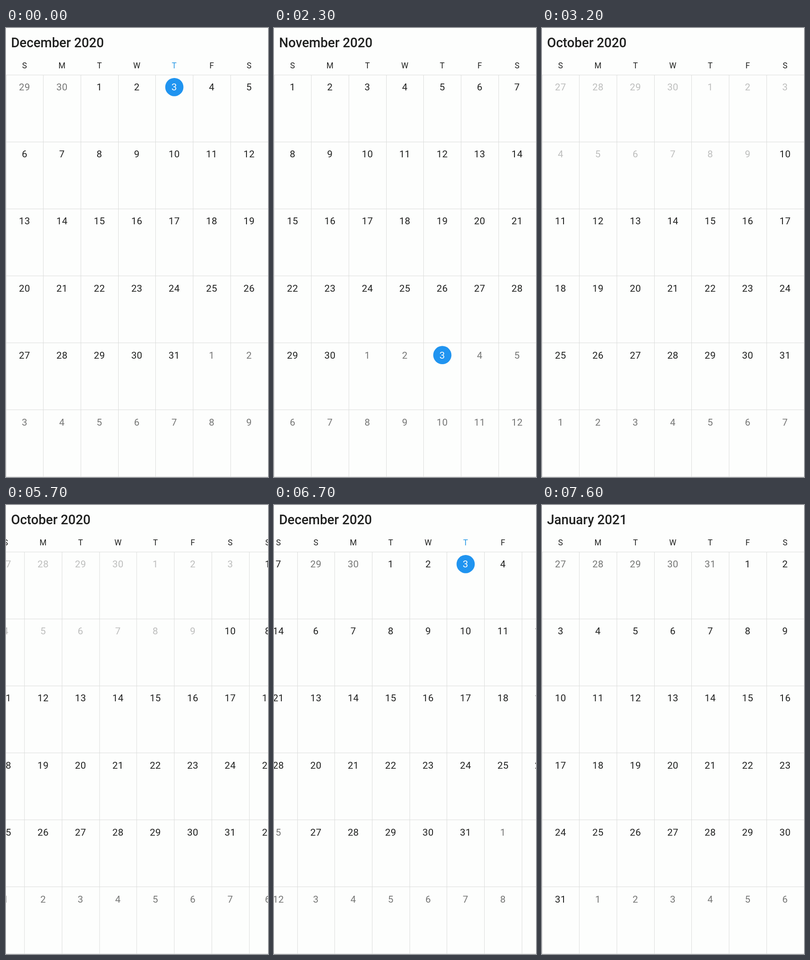
An HTML page that plays this animation: 572x979 px, repeating every 8 s.

```html
<!DOCTYPE html>
<html lang="en">
<head>
<meta charset="utf-8">
<title>Month calendar</title>
<style>
  html, body { margin: 0; width: 100%; height: 100%; overflow: hidden; background: #fdfefd; }
  svg { display: block; width: 572px; height: 979px; }
  text { font-family: Roboto, Arial, sans-serif; fill: #202120; }
  .title { font-size: 28.6px; font-weight: 500; }
  .weekday { font-size: 17.5px; text-anchor: middle; }
  .day { font-size: 21px; letter-spacing: .4px; text-anchor: middle; }
  .outside { fill: #757675; }
  .disabled { fill: #bdbebd; }
  .current { fill: #2a9ae6; }
  .today { fill: #fdfefd; }
  .grid { stroke: #dcdddc; stroke-width: 1; fill: none; }
</style>
</head>
<body>
<svg id="stage" viewBox="0 0 572 979"></svg>
<script>
const WIDTH = 572, HEIGHT = 979, LOOP = 8000, TICK = 100;
const COLUMN = WIDTH / 7, ROW = 146, GRID_TOP = 102.5;
const DAY = 86400000;
const TODAY = Date.UTC(2020, 11, 3), FIRST_ENABLED = Date.UTC(2020, 9, 10);
const MONTHS = ['October 2020', 'November 2020', 'December 2020', 'January 2021'];

// Each swipe follows the finger, then settles; steps are shares of a page per tick.
const SWIPES = [
  { start: 1900, from: 2, to: 1, steps: [.105, .53, .87, .97, 1] },
  { start: 2700, from: 1, to: 0, steps: [.07, .33, .7, .91, .98, 1] },
  { start: 5700, from: 0, to: 1, steps: [.072, .34, .72, .92, .98, 1] },
  { start: 6500, from: 1, to: 2, steps: [.12, .6, .911, .985, 1] },
  { start: 7200, from: 2, to: 3, steps: [.1, .55, .88, .97, 1] }
];

const stage = document.getElementById('stage');

function add(parent, tag, attributes, content = '') {
  const node = document.createElementNS('http://www.w3.org/2000/svg', tag);
  for (const [key, value] of Object.entries(attributes)) node.setAttribute(key, value);
  node.textContent = content;
  return parent.appendChild(node);
}

const centerX = column => 40.5 + column * 81.7;

function dayClass(time, month) {
  if (time === TODAY) return 'day today';
  if (time < FIRST_ENABLED) return 'day disabled';
  return new Date(time).getUTCMonth() === month ? 'day' : 'day outside';
}

function buildPage(index) {
  const page = add(stage, 'g', {});
  const first = new Date(Date.UTC(2020, 9 + index, 1));
  const month = first.getUTCMonth();
  const start = first.getTime() - first.getUTCDay() * DAY;

  let path = '';
  for (let i = 0; i < 7; i++) {
    path += `M0 ${GRID_TOP + i * ROW}H${WIDTH}`;
    path += `M${Math.floor(i * COLUMN) + .5} ${GRID_TOP}V${HEIGHT}`;
  }
  add(page, 'path', { class: 'grid', d: path });

  [...'SMTWTFS'].forEach((letter, column) => {
    const highlighted = month === 11 && column === 4;
    add(page, 'text', {
      class: highlighted ? 'weekday current' : 'weekday', x: centerX(column), y: 88.3
    }, letter);
  });

  for (let i = 0; i < 42; i++) {
    const time = start + i * DAY;
    const x = centerX(i % 7), y = 128.8 + Math.floor(i / 7) * 146.1;
    if (time === TODAY) add(page, 'circle', { cx: x + .2, cy: y, r: 19.9, fill: '#2094f0' });
    add(page, 'text', { class: dayClass(time, month), x, y: y + 7.4 },
      new Date(time).getUTCDate());
  }
  return page;
}

const pages = MONTHS.map((_, index) => buildPage(index));
const title = add(stage, 'text', { class: 'title', x: 10.9, y: 41.6 });

function positionAt(time) {
  let position = 2;
  for (const { start, from, to, steps } of SWIPES) {
    if (time < start) break;
    const step = Math.min(Math.floor((time - start) / TICK), steps.length - 1);
    position = from + (to - from) * steps[step];
  }
  return position;
}

function render(time) {
  const position = positionAt(time);
  pages.forEach((page, index) => {
    const x = (index - position) * WIDTH;
    page.setAttribute('transform', `translate(${x.toFixed(2)} 0)`);
    page.setAttribute('display', Math.abs(x) < WIDTH ? 'inline' : 'none');
  });
  title.textContent = MONTHS[Math.round(position)];
}

const origin = performance.now();
function frame() {
  render((performance.now() - origin) % LOOP);
  requestAnimationFrame(frame);
}
frame();
</script>
</body>
</html>
```
